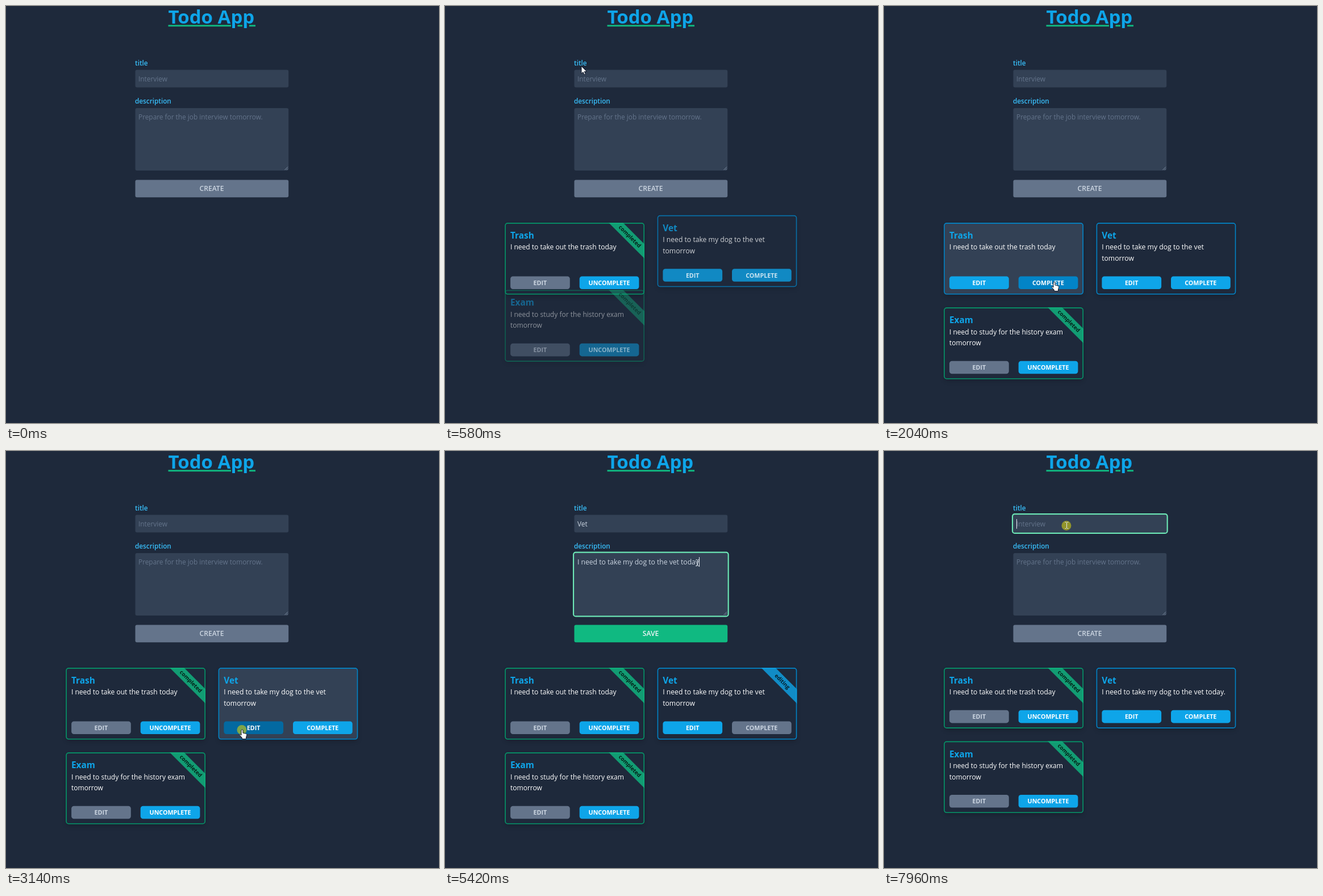
Recreate the animation shown at these times as an HTML page with a canvas. Size 762 by 735 pixels, loop 8000 ms.

```html
<!DOCTYPE html>
<html lang="en">
<head>
<meta charset="utf-8">
<title>Todo App</title>
<style>
  html, body { margin: 0; width: 100%; height: 100%; overflow: hidden; background: #1e293b; }
  canvas { display: block; }
</style>
</head>
<body>
<canvas id="stage" width="762" height="735"></canvas>
<script>
const g = document.getElementById('stage').getContext('2d');
const LOOP = 8000;
const BG = '#1e293b', SLATE = '#334155', GREY = '#64748b', PALE = '#cbd5e1', WHITE = '#ffffff';
const SKY = '#0ea5e9', SKY6 = '#0284c7', SKY7 = '#0369a1', GREEN = '#10b981', GREEN6 = '#059669';
const CARD_W = 245.7;

// Moments of the story
const EDIT_AT = 3230, FOCUS_AT = 4130, SELECT_AT = 4330, SAVE_AT = 7350, TITLE_AT = 7880;
const KEYS = [4880, 5110, 5270, 5350, 5420, 5940];
const CLICKS = [[1730, 1830], [2370, 2470], [3110, 3230], [4130, 4200], [4260, 4340], [7210, 7290], [7880, 8000]];
const PATH = [
  [250, 207, -20], [580, 240, 106], [880, 250, 136], [1700, 299, 486], [2480, 299, 486],
  [3100, 415, 491], [3230, 415, 491], [3930, 444, 197], [5940, 444, 197], [6210, 684, 215],
  [6450, 684, 215], [6750, 540, 128], [7080, 421, 304], [7200, 402, 329], [7380, 402, 329], [7860, 321, 131]
];

const clamp = v => Math.max(0, Math.min(1, v));
const ease = v => (1 - Math.cos(Math.PI * clamp(v))) / 2;
const ramp = (t, start, span = 150) => ease((t - start) / span);
const during = (t, a, b) => t >= a && t < b;

function mix(a, b, k) {
  const part = (c, i) => parseInt(c.slice(i, i + 2), 16);
  const blend = i => Math.round(part(a, i) + (part(b, i) - part(a, i)) * k);
  return '#' + [1, 3, 5].map(i => blend(i).toString(16).padStart(2, '0')).join('');
}

function text(str, x, y, size, color, weight = 400, align = 'left') {
  g.font = `${weight} ${size}px "Open Sans", "Noto Sans", sans-serif`;
  g.textAlign = align;
  g.fillStyle = color;
  g.fillText(str, x, y);
  return g.measureText(str).width;
}

function box(x, y, w, h, r, fill) {
  g.beginPath();
  g.roundRect(x, y, w, h, r);
  if (fill) { g.fillStyle = fill; g.fill(); }
}

function ring(x, y, w, h) {
  box(x - 1.4, y - 1.4, w + 2.8, h + 2.8, 4);
  g.strokeStyle = '#6ee7b7';
  g.lineWidth = 2.2;
  g.stroke();
}

function caret(x, y) {
  g.fillStyle = '#e2e8f0';
  g.fillRect(Math.round(x), y, 1, 17);
}

function ribbon(label, color, alpha) {
  if (alpha <= 0) return;
  g.save();
  box(0, 0, CARD_W, 126, 4.5);
  g.clip();
  g.globalAlpha *= alpha * 0.8;
  g.translate(219.7, 24.4);
  g.rotate(Math.PI / 4);
  g.fillStyle = color;
  g.fillRect(-65, -9, 130, 17.8);
  text(label, 0, 2.8, 9.6, '#000', 700, 'center');
  g.restore();
}

// Soft shadow that stays outside the card
function shadow(h) {
  g.save();
  g.beginPath();
  g.rect(-30, -30, CARD_W + 60, h + 60);
  g.roundRect(0, 0, CARD_W, h, 5);
  g.clip('evenodd');
  g.shadowColor = 'rgba(0,0,0,.2)';
  g.shadowBlur = 9;
  g.shadowOffsetY = 4;
  box(1, 1, CARD_W - 2, h - 2, 5, BG);
  g.restore();
}

function smallButton(x, y, label, fill, color) {
  box(x, y, 104.7, 22.6, 4.5, fill);
  text(label, x + 52.3, y + 15.3, 10.7, color, 700, 'center');
}

function card(c) {
  if (c.enter <= 0) return;
  g.save();
  g.globalAlpha = c.enter;
  g.translate(c.x, c.y - 61 * (1 - c.enter));
  shadow(c.h);
  box(0.8, 0.8, CARD_W - 1.6, c.h - 1.6, 4.2);
  if (c.hover > 0) { g.fillStyle = mix(BG, SLATE, c.hover); g.fill(); }
  g.strokeStyle = mix(SKY6, GREEN6, c.done);
  g.lineWidth = 1.6;
  g.stroke();
  ribbon('completed', GREEN, c.done);
  ribbon('editing', SKY, c.editing);
  text(c.title, 9.6, 28, 15.4, SKY, 700);
  c.lines.forEach((s, i) => text(s, 9.6, 47.3 + i * 19.7, c.size || 12.05, WHITE));
  smallButton(9.8, c.h - 32.1, 'EDIT', mix(c.left || SKY, GREY, c.done), mix(WHITE, PALE, c.done));
  smallButton(131.4, c.h - 32.1, c.done > 0.5 ? 'UNCOMPLETE' : 'COMPLETE', c.right || SKY,
    mix(WHITE, PALE, c.editing));
  g.restore();
}

function cards(t) {
  const enter = i => clamp((t - 99 - i * 130) / 450);
  const h = 126.5 - 19.7 * ramp(t, SAVE_AT, 400);
  const editing = ramp(t, EDIT_AT) - ramp(t, SAVE_AT);
  const pressed = i => during(t, ...CLICKS[i]);
  const toggleHover = ramp(t, 1600) - ramp(t, 2620);
  const editHover = ramp(t, 2950) - ramp(t, 3320);

  card({
    x: 105.3, y: 382.1, h, enter: enter(0), title: 'Trash', lines: ['I need to take out the trash today'],
    done: 1 - ramp(t, 1830) + ramp(t, 2470), editing: 0,
    hover: ramp(t, 1330) - ramp(t, 2740),
    right: pressed(0) || pressed(1) ? SKY7 : mix(SKY, SKY6, toggleHover)
  });
  card({
    x: 373.6, y: 382.1, h, enter: enter(1), title: 'Vet', size: 12.2,
    lines: t >= SAVE_AT ? ['I need to take my dog to the vet today.'] : ['I need to take my dog to the vet', 'tomorrow'],
    done: 0, editing, hover: ramp(t, 2800) - ramp(t, 3420),
    left: pressed(2) ? SKY7 : mix(SKY, SKY6, editHover),
    right: mix(SKY, GREY, editing)
  });
  card({
    x: 105.3, y: 404.8 + h, h: 126.5, enter: enter(2), title: 'Exam',
    lines: ['I need to study for the history exam', 'tomorrow'], done: 1, editing: 0, hover: 0
  });
}

function form(t) {
  const editing = during(t, EDIT_AT, SAVE_AT);
  const typed = KEYS.filter(k => t >= k).length;

  text('title', 227, 104.6, 11.8, '#38bdf8', 600);
  box(227.5, 112.5, 269.7, 31, 3, SLATE);
  text(editing ? 'Vet' : 'Interview', 233, 132.8, 11.9, editing ? PALE : GREY);
  if (t >= TITLE_AT) {
    ring(227.5, 112.5, 269.7, 31);
    caret(233, 120);
  }

  text('description', 227, 172.2, 11.75, '#38bdf8', 600);
  box(227.5, 180, 269.7, 110, 3, SLATE);
  g.strokeStyle = '#94a3b8';
  g.lineWidth = 0.8;
  g.stroke(new Path2D('M490.5 289L496 283.5M493.5 289L496 286.5'));
  if (editing) {
    const head = 'I need to take my dog to the vet ';
    const tail = typed ? 'today.'.slice(0, typed) : 'tomorrow';
    const w = text(head, 233, 200.2, 12.15, PALE);
    const tw = g.measureText(tail).width;
    const selected = !typed && t >= SELECT_AT;
    if (selected) box(233 + w, 187, tw, 17, 0, '#3b82f6');
    text(tail, 233 + w, 200.2, 12.15, selected ? WHITE : PALE);
    if (t >= FOCUS_AT) {
      ring(227.5, 180, 269.7, 110);
      if (!selected) caret(233 + w + tw, 187);
    }
  } else {
    text('Prepare for the job interview tomorrow.', 233, 200.2, 11.85, GREY);
  }

  const ready = editing && typed > 0;
  box(227.5, 306.5, 269.7, 30.8, 3, ready ? mix(GREEN, GREEN6, ramp(t, 7110)) : GREY);
  text(editing ? 'SAVE' : 'CREATE', 362, 326.4, 12.1, ready ? '#f1f5f9' : PALE, 600, 'center');
}

function heading() {
  text('Todo App', 285.5, 31, 33, SKY, 700);
  g.fillStyle = GREEN;
  for (const [a, b] of [[285.5, 396], [407.5, 416], [428, 439]]) g.fillRect(a, 33.3, b - a, 2.9);
}

function pointerAt(t) {
  const i = PATH.findIndex(p => p[0] > t);
  if (i === 0) return null;
  if (i < 0) return PATH.at(-1).slice(1);
  const [a, b] = [PATH[i - 1], PATH[i]];
  const k = ease((t - a[0]) / (b[0] - a[0]));
  return [a[1] + (b[1] - a[1]) * k, a[2] + (b[2] - a[2]) * k];
}

function drawShape(d) {
  const p = new Path2D(d);
  g.lineWidth = 1;
  g.strokeStyle = '#0f172a';
  g.fillStyle = WHITE;
  g.fill(p);
  g.stroke(p);
}

function pointer(t) {
  const pos = pointerAt(t);
  if (!pos) return;
  const [x, y] = pos;
  const over = (l, top, r, b) => x > l && x < r && y > top && y < b;
  if (CLICKS.some(c => during(t, ...c))) {
    g.fillStyle = 'rgba(210,205,15,.6)';
    g.beginPath();
    g.arc(x, y + 0.5, 8.5, 0, 7);
    g.fill();
  }
  g.save();
  g.translate(x, y);
  if (over(227, 112, 497, 143) || over(227, 180, 497, 290)) {
    g.strokeStyle = '#dbe2ea';
    g.lineWidth = 1;
    g.stroke(new Path2D('M-2.5-5.5H-.5L.5-4.5L1.5-5.5H3.5M.5-5V5M-2.5 5.5H-.5L.5 4.5L1.5 5.5H3.5'));
  } else if (over(227, 306, 497, 337) || over(237, 476, 342, 499) || over(383, 476, 488, 499)) {
    drawShape('M-1 1Q.5-1 2 1V6L7.5 7.2Q9 7.8 8.8 9.5L7.5 14V16.5H.5V14.5L-4 9.5Q-4 7.8-2.5 8.4L-1 10Z');
  } else {
    drawShape('M0 0V13.2L3.1 10.4L5.1 15L7.3 14L5.3 9.6H9.6Z');
  }
  g.restore();
}

function draw(now) {
  const t = now % LOOP;
  g.fillStyle = BG;
  g.fillRect(0, 0, 762, 735);
  heading();
  form(t);
  cards(t);
  pointer(t);
  requestAnimationFrame(draw);
}
requestAnimationFrame(draw);
</script>
</body>
</html>
```
